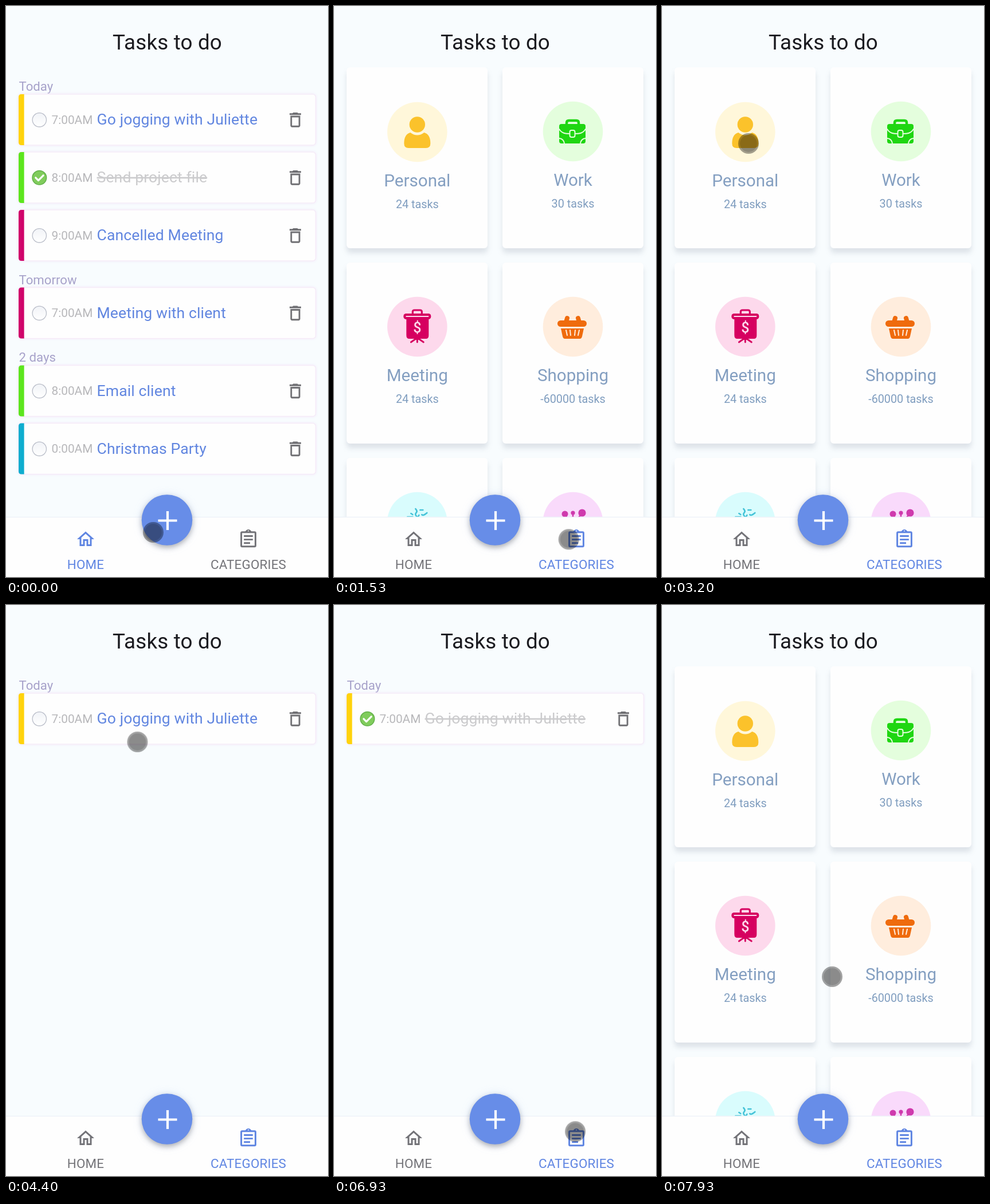
An HTML page for the animation above (8000 ms loop, 562x997 px).

```html
<!DOCTYPE html>
<html lang="en">
<head>
<meta charset="utf-8">
<title>Tasks to do</title>
<style>
  html, body { margin: 0; width: 100%; height: 100%; overflow: hidden; background: #f8fcfe; }
  svg { display: block; width: 100vw; height: 100vh; font-family: Roboto, "Open Sans", sans-serif; }

  .title { font-size: 36.8px; letter-spacing: .15px; fill: #1b1b20; }
  .day { font-size: 22.2px; fill: #a7a2ca; }
  .time { font-size: 20.8px; fill: #b7b7ba; }
  .task { font-size: 26.6px; letter-spacing: .1px; fill: #6186e0; }
  .done { fill: #cbcbcd; text-decoration: line-through; }
  .cat { font-size: 29.6px; fill: #849fc1; }
  .count { font-size: 19.8px; fill: #7f9dbf; }
  .label { font-size: 22.4px; letter-spacing: .15px; fill: currentColor; }
  .mid { text-anchor: middle; }

  .row { fill: #fefefe; stroke: #f5ebf8; stroke-width: 1.5; filter: drop-shadow(0 0 2px #f3eafa); }
  .tile { fill: #fefefe; filter: drop-shadow(0 8px 5px rgba(70, 80, 105, .15)); }
  .fab { fill: #678de8; filter: drop-shadow(0 4px 5px rgba(0, 0, 0, .28)) drop-shadow(0 0 8px rgba(103, 141, 232, .16)); }
  .line { fill: none; stroke: currentColor; }
  .fill { fill: currentColor; }

  .home, .cats, .list, .open, .closed { animation: 8s step-end infinite; }
  .home { animation-name: home; }
  .cats { animation-name: cats; }
  .list { animation-name: list; }
  .open { animation-name: open; }
  .closed { animation-name: closed; }
  @keyframes home { 0% { opacity: 1 } 17.5%, 100% { opacity: 0 } }
  @keyframes cats { 0% { opacity: 0 } 17.5% { opacity: 1 } 43.25% { opacity: 0 } 92.5%, 100% { opacity: 1 } }
  @keyframes list { 0% { opacity: 0 } 43.25% { opacity: 1 } 92.5%, 100% { opacity: 0 } }
  @keyframes open { 0% { opacity: 1 } 70.75%, 100% { opacity: 0 } }
  @keyframes closed { 0% { opacity: 0 } 70.75%, 100% { opacity: 1 } }

  .tab { animation: 8s step-end infinite; }
  .tab.a { animation-name: tabA; }
  .tab.b { animation-name: tabB; }
  @keyframes tabA { 0% { color: #5f85e2 } 17.5%, 100% { color: #737378 } }
  @keyframes tabB { 0% { color: #737378 } 17.5%, 100% { color: #5f85e2 } }

  .touch { animation: touch 8s linear infinite; }
  @keyframes touch {
    0%, 1.2% { transform: translate(257px, 919px); animation-timing-function: ease-in; }
    4.6% { transform: translate(328px, 909px); animation-timing-function: ease-out; }
    8.25%, 9.4% { transform: translate(402px, 929px); animation-timing-function: ease-in-out; }
    11.6%, 17% { transform: translate(410px, 933px); animation-timing-function: ease-in-out; }
    26.6% { transform: translate(407px, 916px); }
    27.5% { transform: translate(403px, 897px); animation-timing-function: cubic-bezier(.4, .1, .5, 1); }
    38.25% { transform: translate(172px, 248px); animation-timing-function: ease-in-out; }
    40%, 52% { transform: translate(151px, 240px); animation-timing-function: ease-in-out; }
    55.8% { transform: translate(237px, 239px); animation-timing-function: ease-in-out; }
    62.5%, 75.2% { transform: translate(51px, 196px); animation-timing-function: cubic-bezier(.45, .05, .5, 1); }
    85.75% { transform: translate(418px, 910px); }
    86.6% { transform: translate(421px, 919px); animation-timing-function: ease-out; }
    88.25%, 92% { transform: translate(425px, 929px); animation-timing-function: cubic-bezier(.45, .1, .6, 1); }
    99.1%, 100% { transform: translate(297px, 649px); }
  }
</style>
</head>
<body>
<svg id="app" viewBox="0 0 562 997" preserveAspectRatio="none"></svg>
<script>
const text = (x, y, cls, str) => `<text x="${x}" y="${y}" class="${cls}">${str}</text>`;
const circle = (x, y, r, attrs = 'class="fill"') => `<circle cx="${x}" cy="${y}" r="${r}" ${attrs}/>`;
const rect = (x, y, w, h, r, attrs = 'class="fill"') =>
  `<rect x="${x}" y="${y}" width="${w}" height="${h}" rx="${r}" ${attrs}/>`;
const shape = d => `<path class="fill" d="${d}"/>`;
const line = (d, w, color = 'currentColor', cap = 'round') =>
  `<path d="${d}" fill="none" stroke="${color}" stroke-width="${w}" stroke-linecap="${cap}" stroke-linejoin="round"/>`;

const YELLOW = '#ffd30c', GREEN = '#5ce61d', RED = '#d0046a', BLUE = '#0eadcf';

const trash = y => `<g transform="translate(487.8 ${y - 17.2}) scale(1.43)" fill="#707074">
  <path d="M6 19c0 1.1.9 2 2 2h8c1.1 0 2-.9 2-2V7H6v12zM8 9h8v10H8V9zm7.5-5l-1-1h-5l-1 1H5v2h14V4h-3.5z"/></g>`;

const box = (y, done) => done
  ? circle(58.3, y, 12.3, 'fill="#80cc5c" stroke="#62b04a" stroke-width="1.5"') + line(`M51.8 ${y}l4.7 4.8 8.6-8.8`, 3.2, '#fff')
  : circle(58.3, y, 12.2, 'fill="url(#knob)" stroke="#b9bdc8" stroke-width="1.3"');

function row(top, color, time, name, done) {
  const y = top + 44.8;
  return rect(22, top, 518.5, 89, 5, 'class="row"')
    + `<path d="M31.6 ${top}v89h-4.6q-5 0-5-5v-79q0-5 5-5z" fill="${color}"/>`
    + box(y, done)
    + text(79.5, y + 7, 'time', time)
    + text(158.5, y + 8.5, done ? 'task done' : 'task', name)
    + trash(y);
}

const JOG = 'Go jogging with Juliette';

const home = text(22.5, 148, 'day', 'Today')
  + row(154, YELLOW, '7:00AM', JOG)
  + row(255, GREEN, '8:00AM', 'Send project file', true)
  + row(356, RED, '9:00AM', 'Cancelled Meeting')
  + text(22.5, 486, 'day', 'Tomorrow')
  + row(491.5, RED, '7:00AM', 'Meeting with client')
  + text(22.5, 621, 'day', '2 days')
  + row(627.5, GREEN, '8:00AM', 'Email client')
  + row(728.5, BLUE, '0:00AM', 'Christmas Party');

const list = text(22.5, 148, 'day', 'Today')
  + `<g class="open">${row(154, YELLOW, '7:00AM', JOG)}</g>`
  + `<g class="closed">${row(154, YELLOW, '7:00AM', JOG, true)}</g>`;

// Icons are drawn around the centre of their disc.
const person = circle(0, -13, 13.7)
  + shape('M-12 1Q0 10 12 1Q23 4 23 20Q23 28 15 28H-15Q-23 28-23 20Q-23 4-12 1Z');

const briefcase = bg => line('M-11-12v-3q0-4 4-4h13q4 0 4 4v3', 4.5)
  + rect(-24, -13, 46, 34, 4)
  + line('M-24-4C-19 4-12 4-6 4M4 4C10 4 17 4 22-4', 2, bg)
  + line('M-24 12q8 1 9 9M22 12q-8 1-9 9', 2, bg)
  + rect(-5.5, -2, 9, 12, 3, `fill="currentColor" stroke="${bg}" stroke-width="2"`);

const board = bg => line('M-8-23v-3q0-3 3-3h10q3 0 3 3v3', 3.2)
  + rect(-24, -23, 48, 10, 4.5) + line('M-19-18H19', 2.2, bg)
  + shape('M-19-14H20V15q0 6-5 6H-14q-5 0-5-6z')
  + line('M-1 20L-11 27M1 20L11 27M0 20V27', 2.8)
  + `<text y="10" font-size="25" font-weight="500" fill="${bg}" class="mid">$</text>`;

const basket = bg => line('M-10-15L-12-8M9-15L11-8', 8)
  + rect(-27, -11, 51, 11, 5.5)
  + shape('M-21 3H19L16 17q-1 4-4 4H-14q-3 0-4-4z')
  + line('M-12 6l2 9M-5 6l1 9M4 6l-1 9M11 6l-2 9', 2, bg);

const sparks = line('M-3-23q4 4 1 7t2 7M5-21h5M-17-9l9 0M8-13q2 3 9-3M3-12l-2 4M-11-15l3 2', 2.6);

const dots = circle(-14, -14, 5.5) + circle(0, -16, 3.6) + circle(16, -16, 6.6)
  + line('M-12-10l5 8M0-14V0M13-12L6-2', 2.6);

function tile(col, top, dy, bg, color, icon, name, count) {
  const x = 22 + col * 272, cx = 145.3 + col * 271.7, cy = top + 112 + dy;
  const art = typeof icon === 'function' ? icon(bg) : icon;
  return rect(x, top, 246, 316, 6, 'class="tile"')
    + circle(cx, cy, 52.3, `fill="${bg}"`)
    + `<g transform="translate(${cx} ${cy})" color="${color}">${art}</g>`
    + text(cx, cy + 94.5, 'cat mid', name)
    + text(cx, cy + 133, 'count mid', count);
}

const cats = tile(0, 107, 1, '#fff7da', '#fbc22b', person, 'Personal', '24 tasks')
  + tile(1, 107, 0, '#e4fedd', '#1fd612', briefcase, 'Work', '30 tasks')
  + tile(0, 448, 0, '#fdd9ec', '#d60060', board, 'Meeting', '24 tasks')
  + tile(1, 448, 0, '#ffeddd', '#ef6b0d', basket, 'Shopping', '-60000 tasks')
  + tile(0, 789, 0, '#d9fcfd', '#45c3d8', sparks, '', '')
  + tile(1, 789, 0, '#f9dafb', '#cf3aad', dots, '', '');

const house = `<path class="fill" transform="translate(121 912.9) scale(1.5)"
  d="M12 5.69l5 4.5V18h-2v-6H9v6H7v-7.81l5-4.5M12 3L2 12h3v8h6v-6h2v6h6v-8h3L12 3z"/>`;

const clipboard = rect(410.6, 918.8, 24.8, 25, 1.5, 'class="line" stroke-width="3"')
  + '<path class="fill" fill-rule="evenodd" d="M417 919q2-5 6-5t6 5zM421.8 917a1.2 1.2 0 1 0 2.4 0a1.2 1.2 0 1 0-2.4 0z"/>'
  + line('M415.2 925.5H430.8M415.2 931.6H430.8M415.2 937.8H426', 2.9, 'currentColor', 'butt');

const nav = rect(0, 892, 562, 105, 0, 'fill="#fefefe"')
  + line('M0 892.5H562', 1.3, '#edf2f8', 'butt')
  + `<g class="tab a">${house}${text(139, 983, 'label mid', 'HOME')}</g>`
  + `<g class="tab b">${clipboard}${text(423, 983, 'label mid', 'CATEGORIES')}</g>`
  + circle(281, 897.5, 44.3, 'class="fab"')
  + line('M265.5 898.5H298.5M282 882V915', 4.2, '#fff', 'butt');

const touch = `<g class="touch">${circle(0, 0, 18, 'fill="rgba(0,0,0,.36)"')}${circle(0, 0, 15, 'fill="rgba(0,0,0,.14)"')}</g>`;

document.getElementById('app').innerHTML = `
  <defs><linearGradient id="knob" x2="0" y2="1">
    <stop stop-color="#f1f3f7"/><stop offset="1" stop-color="#fff"/>
  </linearGradient></defs>
  ${rect(0, 0, 562, 997, 0, 'fill="#f8fcfe"')}
  ${text(281.5, 76, 'title mid', 'Tasks to do')}
  <g class="home">${home}</g>
  <g class="cats">${cats}</g>
  <g class="list">${list}</g>
  ${nav}${touch}`;
</script>
</body>
</html>
```
